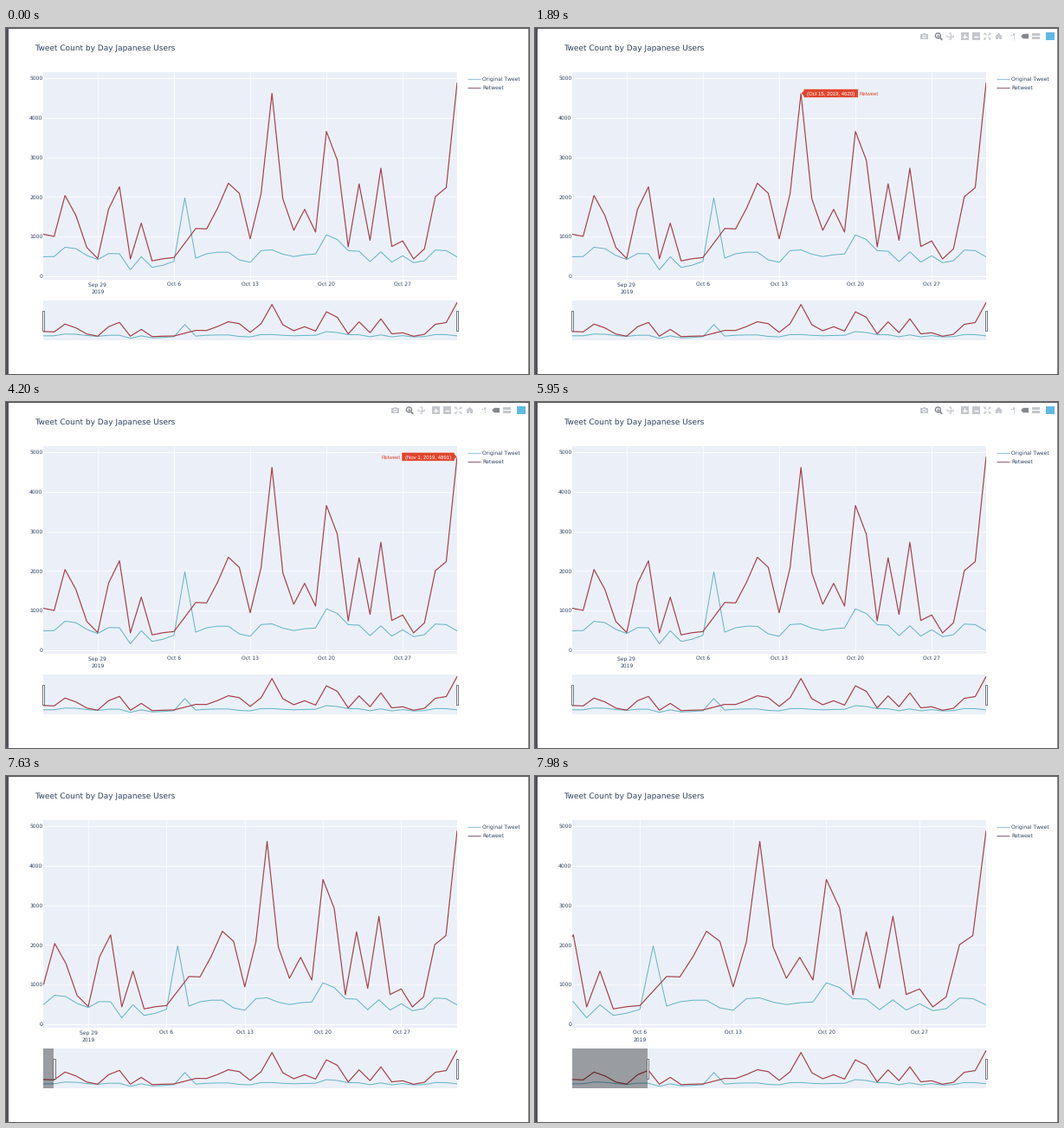
Recreate the animation shown at these times as a matplotlib script. Size 604x400 px, loop 8 s.

```python
import numpy as np
import matplotlib.pyplot as plt
from matplotlib.animation import FuncAnimation
from matplotlib.patches import Circle, Polygon, Rectangle

W, H, DPI = 604, 400, 100
PT = 72 / DPI
LOOP, STEP, TICK = 8000, 40, 70

plt.rcParams["font.family"] = "DejaVu Sans"
plt.rcParams["text.hinting"] = "none"
plt.rcParams["text.hinting_factor"] = 1

INK, PANEL = "#2f4260", "#ebf0f8"
RED, CYAN, HOVER = "#a8404a", "#63b4c6", "#df452e"
ICON, ACTIVE = "#c3c6cc", "#83878f"

retweets = np.array([
    1055, 1000, 2035, 1530, 720, 440, 1690, 2255, 430, 1335, 380, 435, 465,
    830, 1200, 1190, 1710, 2345, 2090, 940, 2080, 4620, 1950, 1155, 1685,
    1110, 3655, 2930, 735, 2330, 900, 2725, 745, 885, 430, 685, 2005, 2235,
    4891])
originals = np.array([
    485, 490, 725, 690, 520, 415, 565, 560, 155, 485, 215, 270, 370, 1975,
    450, 560, 600, 600, 405, 345, 640, 660, 550, 490, 535, 555, 1040, 920,
    640, 625, 360, 610, 350, 510, 335, 385, 655, 640, 480])
days = np.arange(39)
LAST = 38
WEEKS = {5: "Sep 29", 12: "Oct 6", 19: "Oct 13", 26: "Oct 20", 33: "Oct 27"}

X0, X1 = 43, 521
TOP, BOTTOM = 51.3, 291.3
S_TOP, S_BOTTOM = 315, 361

fig = plt.figure(figsize=(W / DPI, H / DPI), dpi=DPI, facecolor="white")
ax = fig.add_axes([0, 0, 1, 1])
ax.set_xlim(0, W)
ax.set_ylim(H, 0)
ax.axis("off")


def value_y(v):
    return 286.6 - np.asarray(v) * 0.04568


def slider_y(v):
    return S_TOP + (value_y(v) - TOP) * (S_BOTTOM - S_TOP) / (BOTTOM - TOP)


def day_x(d, start=0):
    return X0 + (np.asarray(d) - start) * (X1 - X0) / (LAST - start)


def box(x0, y0, x1, y1, color, z=1, **kw):
    return ax.add_patch(Rectangle((x0, y0), x1 - x0, y1 - y0, fc=color,
                                  zorder=z, **{"lw": 0, **kw}))


def line(xs, ys, color, width=1.0, z=2, **kw):
    kw.setdefault("solid_capstyle", "butt")
    return ax.plot(xs, ys, color=color, lw=width * PT, zorder=z, **kw)[0]


def label(x, y, s, px=6.1, color=INK, ha="left", z=6, **kw):
    """Text whose capitals are centred on y."""
    return ax.text(x, y + 0.36 * px, s, fontsize=px * PT, color=color, ha=ha,
                   va="baseline", zorder=z, **kw)


def shape(points, color, z=2, **kw):
    return ax.add_patch(Polygon(points, fc=color, zorder=z, **{"lw": 0, **kw}))


def dot(x, y, r, color, z=3):
    ax.add_patch(Circle((x, y), r, fc=color, lw=0, zorder=z))


def draw_modebar():
    # camera
    box(445.4, 7, 453.8, 13.2, ICON)
    box(448, 5.9, 451.2, 7.2, ICON)
    dot(449.6, 10, 2.1, "white")
    dot(449.6, 10, 1.2, ICON)
    # zoom
    ax.add_patch(Circle((465.4, 8.9), 3, fc="none", ec=ACTIVE, lw=1.4 * PT))
    line([467.6, 470.3], [11.1, 13.8], ACTIVE, 1.8)
    line([463.8, 467], [8.9, 8.9], ACTIVE, 0.9)
    line([465.4, 465.4], [7.3, 10.5], ACTIVE, 0.9)
    # pan
    line([476, 483], [9.6, 9.6], ICON)
    line([479.5, 479.5], [6, 13], ICON)
    for dx, dy in ((1, 0), (-1, 0), (0, 1), (0, -1)):
        cx, cy = 479.5 + 2.9 * dx, 9.6 + 2.9 * dy
        shape([(cx + 1.8 * dx, cy + 1.8 * dy), (cx + 1.8 * dy, cy + 1.8 * dx),
               (cx - 1.8 * dy, cy - 1.8 * dx)], ICON)
    # zoom in and out
    for cx in (496.3, 509.4):
        box(cx - 4.2, 5.4, cx + 4.2, 13.8, ICON)
        line([cx - 2.6, cx + 2.6], [9.6, 9.6], "white", 1.4)
    line([496.3, 496.3], [7, 12.2], "white", 1.4)
    # autoscale
    for dx in (-1, 1):
        for dy in (-1, 1):
            cx, cy = 522.4 + 3.9 * dx, 9.6 + 3.9 * dy
            line([522.4 + dx, cx], [9.6 + dy, cy], ICON, 1.1)
            shape([(cx, cy), (cx - 2.6 * dx, cy), (cx, cy - 2.6 * dy)], ICON)
    # home
    shape([(531, 9.9), (535.5, 5.8), (540, 9.9)], ICON)
    shape([(532.3, 9.5), (538.7, 9.5), (538.7, 13.3), (536.4, 13.3),
           (536.4, 10.8), (534.6, 10.8), (534.6, 13.3), (532.3, 13.3)], ICON)
    # spike lines
    line([553.2, 553.2], [6.4, 14], ICON, 1, dashes=(1.6, 0.9))
    line([548.6, 552], [8.2, 8.2], ICON, 1, dashes=(1.6, 0.9))
    dot(553.2, 7.6, 1.2, ICON)
    # hover modes
    shape([(561.2, 9.5), (563.8, 6.8), (570, 6.8), (570, 12.3),
           (563.8, 12.3)], ACTIVE)
    box(574.3, 6.1, 583, 9, ICON)
    box(574.3, 10.2, 583, 13.1, ICON)
    box(590.4, 4.7, 600, 14.3, "#5db9e6")
    return box(444, 3.5, 601.5, 16, "white", z=8)


def hover(x, y, text, width, side):
    """Tooltip beside (x, y); side is 1 for right, -1 for left."""
    a, b = x + 3 * side, x + (3 + width) * side
    ha = "left" if side > 0 else "right"
    font = dict(px=6.5, z=11, family="Liberation Sans")
    tag = shape([(x, y), (a, y - 3), (a, y - 5), (b, y - 5), (b, y + 5),
                 (a, y + 5), (a, y + 3)], HOVER, z=10, ec="white", lw=0.5 * PT)
    return [tag,
            label((a + b) / 2, y, text, color="white", ha="center", **font),
            label(b + 1.8 * side, y, "Retweet", color=HOVER, ha=ha, **font)]


def handle(x):
    return box(x - 1.3, 326.5, x + 1.3, 349.5, "white", z=7,
               ec="#555a63", lw=0.8 * PT)


# window edges
box(0, 0, 3.2, H, "#54535f", z=9)
line([0, W], [0.4, 0.4], "#4a4a50", 0.9, z=9)
line([603.4, 603.4], [0, H], "#6a6a70", 0.8, z=9)

label(33, 22.8, "Tweet Count by Day Japanese Users", px=8.64)

panel = box(X0, TOP, X1, BOTTOM, PANEL)
box(X0, S_TOP, X1, S_BOTTOM, PANEL)
for v in range(0, 5001, 1000):
    line([X0, X1], [value_y(v)] * 2, "white", 0.7 if v else 1.2)
    label(42.4, value_y(v), str(v), ha="right")

for y, color, name in ((58.7, "#9bcbd6", "Original Tweet"),
                       (68.6, "#99788c", "Retweet")):
    line([533, 547.6], [y, y], color, 1.3)
    label(550.3, y, name)

grid = {d: line([0, 0], [TOP, BOTTOM], "white", 0.7) for d in WEEKS}
ticks = {d: label(0, 296.2, s, ha="center") for d, s in WEEKS.items()}
year = label(0, 304.3, "2019", ha="center")

traces = []
for data, color, width in ((originals, CYAN, 1.0), (retweets, RED, 1.2)):
    trace = line(day_x(days), value_y(data), color, width, z=4)
    trace.set_clip_path(panel)
    traces.append(trace)
    line(day_x(days), slider_y(data), color, width, z=4)

mask = box(X0, S_TOP, X0, S_BOTTOM, "black", z=6, alpha=0.35)
left = handle(X0)
handle(X1)

cover = draw_modebar()
hovers = [
    (1610, 2450, hover(day_x(21), 75.5, "(Oct 15, 2019, 4620)", 63, 1)),
    (4200, 4830, hover(day_x(38), 63.2, "(Nov 1, 2019, 4891)", 61, -1)),
]


def drag(t):
    """Pixels the left slider handle has been pulled."""
    return 87 * (max(t - 7420, 0) / 560) ** 2


def update(i):
    t = (i * STEP + 30) // TICK * TICK

    cover.set_alpha(1 - np.interp(t, [1330, 1610, 7210, 7400], [0, 1, 1, 0]))
    for begin, end, parts in hovers:
        for part in parts:
            part.set_visible(begin <= t < end)

    pulled = drag(t)
    start = pulled * LAST / (X1 - X0)
    mask.set_width(pulled)
    left.set_x(X0 + pulled - 1.3)
    for trace in traces:
        trace.set_xdata(day_x(days, start))

    for d in WEEKS:
        x, shown = day_x(d, start), d >= start
        grid[d].set_xdata([x, x])
        grid[d].set_visible(shown)
        ticks[d].set_x(x)
        ticks[d].set_visible(shown)
    year.set_x(day_x(min(d for d in WEEKS if d >= start), start))
    return []


anim = FuncAnimation(fig, update, frames=LOOP // STEP, interval=STEP,
                     repeat=True, repeat_delay=0)
plt.show()
```
